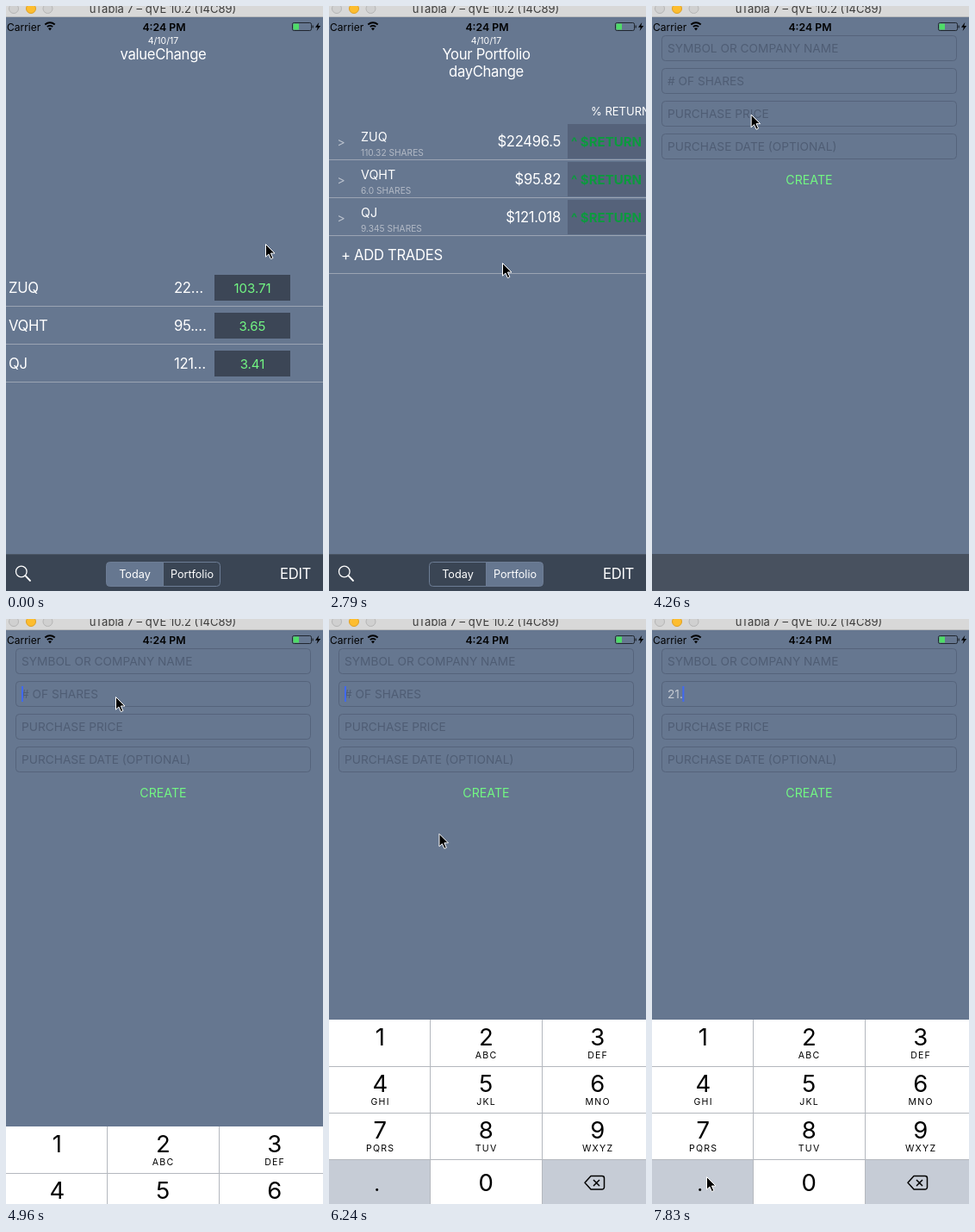
Recreate the animation shown at these times as an HTML page. Size 368 px wide and 679 px high, loop 8 s.

```html
<!DOCTYPE html>
<html lang="en">
<head>
<meta charset="utf-8">
<title>Stock portfolio</title>
<style>
html, body { margin: 0; width: 100%; height: 100%; overflow: hidden; background: #667790; }
svg { display: block; width: 368px; height: 679px; font-family: Inter, Roboto, sans-serif; }
text { white-space: pre; }
</style>
</head>
<body>
<svg id="stage" viewBox="0 0 368 679"></svg>
<script>
const NS = 'http://www.w3.org/2000/svg';
const LOOP = 8000;
const BG = '#667790', BAR = '#3a4554', KEY_GRAY = '#c6ccd6', GREEN = '#72f783';
const stage = document.getElementById('stage');

function add(parent, tag, attrs = {}, content) {
  const el = document.createElementNS(NS, tag);
  for (const k in attrs) el.setAttribute(k, attrs[k]);
  if (content !== undefined) el.textContent = content;
  return parent.appendChild(el);
}
const group = (parent) => add(parent, 'g');
const rect = (p, x, y, width, height, fill, more) => add(p, 'rect', { x, y, width, height, fill, ...more });
const path = (p, d, more) => add(p, 'path', { d, fill: 'none', ...more });
const circle = (p, cx, cy, r, more) => add(p, 'circle', { cx, cy, r, ...more });

// Larger sizes are set slightly tighter.
function label(p, str, x, y, size, fill = '#fff', more = {}) {
  return add(p, 'text', {
    x, y, fill, 'font-size': size, 'letter-spacing': size > 16 ? '-0.02em' : 0, ...more
  }, str);
}
const MID = { 'text-anchor': 'middle' }, END = { 'text-anchor': 'end' };

const rows = [
  { name: 'ZUQ', shares: '110.32', short: '22…', price: '$22496.5', gain: '103.71' },
  { name: 'VQHT', shares: '6.0', short: '95.…', price: '$95.82', gain: '3.65' },
  { name: 'QJ', shares: '9.345', short: '121…', price: '$121.018', gain: '3.41' }
];
const rule = (p, y) => rect(p, 0, y, 368, 1, '#9ba4b3');

function buildToday() {
  const g = group(stage);
  label(g, 'valueChange', 182.5, 62, 16.7, '#fff', MID);
  rows.forEach((r, i) => {
    const y = 305 + i * 44;
    label(g, r.name, 3, y + 28, 16.7);
    label(g, r.short, 195, y + 28, 16.7);
    rect(g, 242, y + 7, 88, 30, '#3c4656');
    label(g, r.gain, 286, y + 27.5, 15, GREEN, MID);
    rule(g, y + 43);
  });
  return g;
}

function buildPortfolio() {
  const g = group(stage);
  label(g, 'Your Portfolio', 182.5, 62, 16.7, '#fff', MID);
  label(g, 'dayChange', 182.5, 82, 16.7, '#fff', MID);
  label(g, '% RETURN', 304, 126.5, 13);
  rows.forEach((r, i) => {
    const y = 135 + i * 44;
    label(g, '>', 9.5, y + 28, 14, '#bcc3ce');
    label(g, r.name, 37, y + 21.5, 14.3);
    label(g, r.shares + ' SHARES', 37, y + 39, 10.2, '#b3bac6');
    label(g, r.price, 269, y + 28, 16.7, '#fff', END);
    rect(g, 277, y + 2, 91, 40, '#55627a');
    label(g, '^ $RETURN', 281, y + 27.5, 15, '#0c9a3e', { 'font-weight': 700 });
    rule(g, y + 43);
  });
  label(g, '+ ADD TRADES', 14, 295, 16.7);
  rule(g, 310);
  return g;
}

function buildToolbar() {
  const g = group(stage);
  rect(g, 0, 636, 368, 43, BAR);
  rect(g, 0, 636, 368, 1, '#4b5665');
  circle(g, 17.8, 656.5, 6.3, { fill: 'none', stroke: '#fff', 'stroke-width': 1.3 });
  path(g, 'M22.4 661.2L28 667', { stroke: '#fff', 'stroke-width': 1.8, 'stroke-linecap': 'round' });
  const left = path(g, 'M182.5 645.5H120.5a4 4 0 0 0-4 4V669.5a4 4 0 0 0 4 4H182.5Z');
  const right = path(g, 'M182.5 645.5H244.5a4 4 0 0 1 4 4V669.5a4 4 0 0 1-4 4H182.5Z');
  for (const half of [left, right]) half.setAttribute('stroke', '#6d7d95');
  label(g, 'Today', 149.5, 664, 12.7, '#fff', MID);
  label(g, 'Portfolio', 216, 664, 12.7, '#fff', MID);
  label(g, 'EDIT', 354, 665, 16.7, '#fff', END);
  return { left, right };
}

function buildForm() {
  const g = group(stage);
  rect(g, 0, 14, 368, 665, BG);
  rect(g, 0, 636, 368, 43, '#48515f');
  const hints = ['SYMBOL OR COMPANY NAME', '# OF SHARES', 'PURCHASE PRICE', 'PURCHASE DATE (OPTIONAL)']
    .map((hint, i) => {
      const y = 34.5 + i * 38;
      rect(g, 11.5, y, 342, 29, 'none', { rx: 4, stroke: '#55637b' });
      return label(g, hint, 18, y + 19.3, 13.7, '#4f5d74');
    });
  label(g, 'CREATE', 182.5, 206.5, 14.2, GREEN, MID);
  const typed = label(g, '', 18, 91.8, 13.7, '#c6cbd3');
  const caret = rect(g, 18, 78, 2, 18, '#4169f0');
  return { g, hint: hints[1], typed, caret };
}

function buildKeypad() {
  const g = group(stage);
  const xs = [0, 118, 248, 368], mids = [59, 182, 311.5];
  const letters = ['', 'ABC', 'DEF', 'GHI', 'JKL', 'MNO', 'PQRS', 'TUV', 'WXYZ'];
  const keys = {};
  rect(g, 0, 465, 368, 220, '#b4b8be');
  for (let i = 0; i < 12; i++) {
    const col = i % 3, row = Math.floor(i / 3), y = 465 + row * 54;
    const name = i < 9 ? String(i + 1) : ['.', '0', 'back'][col];
    const gray = name === '.' || name === 'back';
    keys[name] = rect(g, xs[col], y + (row ? 1 : 0), xs[col + 1] - xs[col] - (col < 2 ? 1 : 0),
      row ? 53 : 54, gray ? KEY_GRAY : '#fff');
    if (name === 'back') continue;
    const base = row < 3 ? y + 30 : y + 37;
    label(g, name, name === '.' ? 55.5 : mids[col], base, name === '.' ? 24 : 27.5, '#000', MID);
    if (letters[i]) label(g, letters[i], mids[col] + 0.6, y + 45.3, 10.6, '#000', { ...MID, 'letter-spacing': 1.2 });
  }
  path(g, 'M304 646.5H317a2.5 2.5 0 0 1 2.5 2.5V659.5a2.5 2.5 0 0 1-2.5 2.5H304L297 654.2Z M307 651l7 7M314 651l-7 7',
    { stroke: '#000', 'stroke-width': 1.5, 'stroke-linejoin': 'round' });
  return { g, keys };
}

function buildTop() {
  const g = group(stage);
  rect(g, 0, 0, 368, 13, '#d8d8d8');
  rect(g, 0, 12, 368, 1, '#b9babc');
  [['#d0d0d0', '#b5b5b5', 9], ['#fdbd2f', '#dfa023', 29], ['#d0d0d0', '#b5b5b5', 48.5]]
    .forEach(([fill, stroke, x]) => circle(g, x, 3, 5.5, { fill, stroke }));
  label(g, 'uTabla 7 – qVE 10.2 (14C89)', 182, 8, 13, '#3d3d3d', MID);
  label(g, 'Carrier', 1, 28.5, 12, '#000');
  [[6, 2], [3.4, 1.8]].forEach(([r, w]) => {
    const d = r * 0.95;
    path(g, `M${51 - d} ${27.5 - r}Q51 ${27.5 - r * 1.75} ${51 + d} ${27.5 - r}`,
      { stroke: '#000', 'stroke-width': w });
  });
  path(g, 'M49 26Q51 24.4 53 26L51 28.4Z', { fill: '#000' });
  label(g, '4:24 PM', 183.5, 28.5, 12.3, '#000', { ...MID, 'font-weight': 600 });
  rect(g, 332.5, 19.5, 22, 9, 'none', { rx: 1.8, stroke: '#20262f' });
  rect(g, 333.5, 20.5, 6.5, 7, '#4fdc68');
  rect(g, 355.5, 22.5, 1.3, 3, '#20262f');
  path(g, 'M363.3 19L359 24.8H361.8L360.6 29L365.2 23H362.3Z', { fill: '#000' });
}

label(stage, '4/10/17', 182.5, 44, 10.5, '#fff', MID);
const today = buildToday();
const portfolio = buildPortfolio();
const tabs = buildToolbar();
const form = buildForm();
const pad = buildKeypad();
buildTop();
const cursor = path(stage, 'M0.5 0.5V15.2L3.9 12L6.4 17.6L8.9 16.5L6.4 11H11Z',
  { fill: '#000', stroke: '#fff', 'stroke-width': 1, 'stroke-linejoin': 'round' });

// time, x, y of the pointer tip
const trail = [
  [50, 301, 276], [840, 219, 666], [900, 218, 665], [1800, 218, 664], [2490, 230, 346],
  [2790, 201, 298], [3680, 201, 298], [4110, 110, 139], [4550, 127, 90], [4960, 127, 90],
  [5300, 124, 108], [5650, 120, 180], [6010, 120, 180], [6810, 157, 521], [6880, 156, 518],
  [7040, 74, 509], [7220, 71, 500], [7520, 63, 647]
];
const typing = [[6870, '2'], [7200, '21'], [7560, '21.']];
const presses = [['2', 6870, 7090, KEY_GRAY], ['1', 7200, 7340, KEY_GRAY], ['.', 7560, 7770, '#fff']];

function pointerAt(t) {
  if (t <= trail[0][0]) return trail[0].slice(1);
  const i = trail.findIndex(p => p[0] > t);
  if (i < 0) return trail[trail.length - 1].slice(1);
  const [t0, x0, y0] = trail[i - 1], [t1, x1, y1] = trail[i];
  const k = (t - t0) / (t1 - t0), e = k * k * (3 - 2 * k);
  return [x0 + (x1 - x0) * e, y0 + (y1 - y0) * e];
}

// Distance left to travel for a sheet settling into place.
const settle = (t, start, distance, tau) =>
  t < start ? distance : Math.round(distance * Math.exp((start - t) / tau));

const show = (el, on) => el.setAttribute('visibility', on ? 'visible' : 'hidden');
const shift = (el, x, y) => el.setAttribute('transform', `translate(${x} ${y})`);

function render(t) {
  const onPortfolio = t >= 1740;
  show(today, !onPortfolio);
  show(portfolio, onPortfolio);
  tabs.left.setAttribute('fill', onPortfolio ? BAR : BG);
  tabs.right.setAttribute('fill', onPortfolio ? BG : BAR);

  shift(form.g, 0, settle(t, 3351, 665, 85));
  shift(pad.g, 0, settle(t, 4922, 216, 70));

  const text = typing.reduce((s, [at, str]) => t >= at ? str : s, '');
  if (form.typed.textContent !== text) form.typed.textContent = text;
  show(form.hint, !text);
  form.caret.setAttribute('x', 18 + (text ? form.typed.getComputedTextLength() - 0.5 : 0));
  show(form.caret, t >= 4900 && (text || (t - 4900) % 1110 < 560));

  for (const [name, from, to, fill] of presses) {
    const rest = name === '.' ? KEY_GRAY : '#fff';
    const fading = name === '.' && t >= to && t < to + 60;
    pad.keys[name].setAttribute('fill', t >= from && t < to ? fill : fading ? '#dfe3e9' : rest);
  }
  shift(cursor, ...pointerAt(t));
}

const begin = performance.now();
function tick() {
  render((performance.now() - begin) % LOOP);
  requestAnimationFrame(tick);
}
tick();
</script>
</body>
</html>
```
